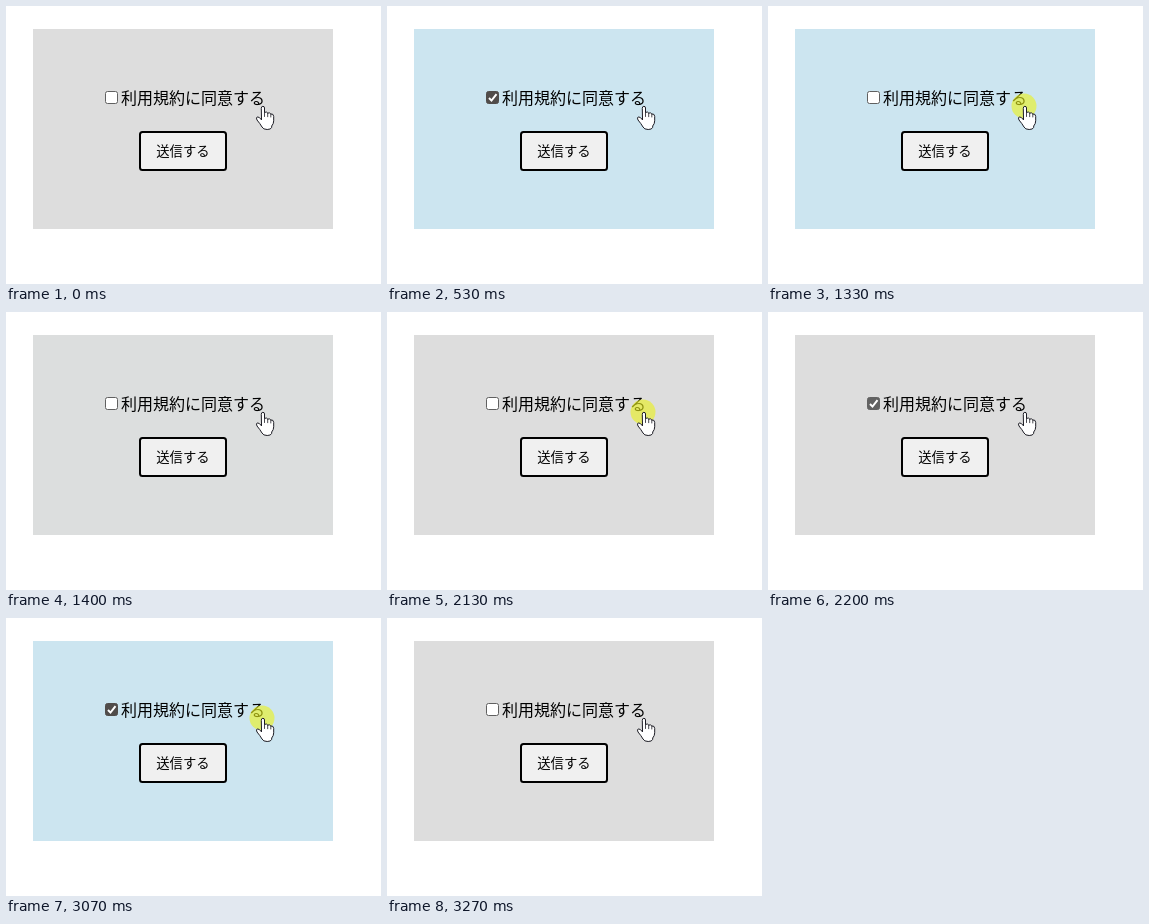
Animation of 375 by 278 pixels, one loop 3800 ms. Source, as an HTML page:

```html
<!DOCTYPE html>
<html lang="ja">
<head>
<meta charset="utf-8">
<style>
  html, body { margin: 0; width: 100%; height: 100%; overflow: hidden; background: #fff; }
  svg { display: block; width: 375px; height: 278px; }
  text { font-family: "Noto Sans CJK JP", "Noto Sans CJK", sans-serif; fill: #000; }
</style>
</head>
<body>
<svg viewBox="0 0 375 278">
  <rect id="panel" x="27" y="23" width="300" height="200"/>
  <rect id="box" x="99.5" y="85.5" width="12" height="12" rx="2"/>
  <path id="tick" d="M102 92l2.5 2.6 5-6.4" fill="none" stroke="#fff" stroke-width="2"/>
  <text x="115" y="98" font-size="16">利用規約に同意する</text>
  <rect x="134" y="126" width="86" height="38" rx="2.5" fill="#f0f0f0" stroke="#000" stroke-width="2"/>
  <text x="150.3" y="149.5" font-size="13.333">送信する</text>
  <circle id="press" cx="256" cy="100" r="12.5" fill="#ebf117" opacity=".6"/>
  <g stroke="#1c1c24" stroke-linejoin="round" stroke-linecap="round">
    <path fill="#fff" d="M255.3 102q0-1.7 1.6-1.7t1.6 1.7v4.3q2.6-.8 3.2.8 2.4-.8 3.1.9 2.7-.5 2.9 2.4v4.4q0 3-2 5.2v1.5q-1 2-4.5 2-4 0-5.2-2.5-2-3.5-5-7-1.2-2.3.3-3.1 2-.3 4 2.7z"/>
    <path fill="none" stroke-width=".8" d="M258.5 106.3v4.2m3.2-3.4v3.6m3.1-2.7v3"/>
  </g>
</svg>
<script>
  const LOOP = 3800;
  const GREY = [221, 221, 221], BLUE = [204, 229, 240];
  // start time, checked, pressed, share of blue in the panel
  const steps = [
    [0, false, false, 0],
    [330, false, true, 0],
    [460, true, false, 0.5],
    [530, true, false, 1],
    [1270, true, true, 1],
    [1330, false, true, 1],
    [1400, false, false, 0.07],
    [1470, false, false, 0],
    [2130, false, true, 0],
    [2200, true, false, 0],
    [2260, true, false, 0.88],
    [2330, true, false, 1],
    [3070, true, true, 1],
    [3200, false, false, 0.5],
    [3270, false, false, 0]
  ];
  const el = id => document.getElementById(id);
  const panel = el("panel"), box = el("box"), tick = el("tick"), press = el("press");
  const show = (node, on) => node.setAttribute("visibility", on ? "visible" : "hidden");

  function draw(now) {
    const time = now % LOOP;
    const [, checked, pressed, blue] = steps.findLast(([start]) => start <= time);
    const colour = GREY.map((c, i) => Math.round(c + (BLUE[i] - c) * blue));
    const shade = blue === 1 ? "#504c4a" : "#626262";
    panel.setAttribute("fill", `rgb(${colour})`);
    box.setAttribute("fill", checked ? shade : "#fff");
    box.setAttribute("stroke", checked ? shade : "#606060");
    show(tick, checked);
    show(press, pressed);
  }

  const begin = performance.now();
  function loop() {
    draw(performance.now() - begin);
    requestAnimationFrame(loop);
  }
  loop();
</script>
</body>
</html>
```
